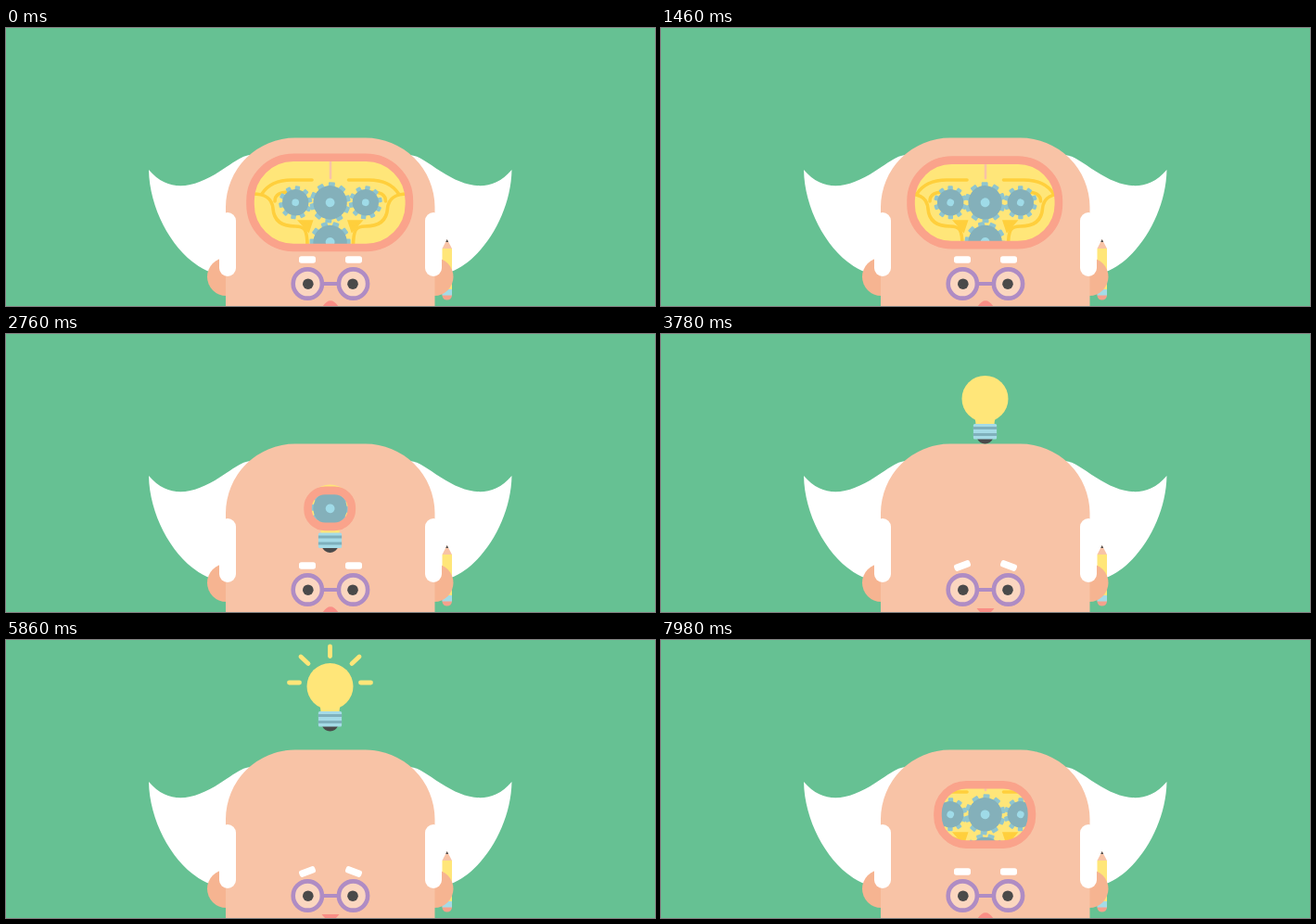
An HTML page that plays this animation: 700x300 px, repeating every 8 s.

```html
<!DOCTYPE html>
<html lang="en">
<head>
<meta charset="utf-8">
<title>Bright idea</title>
<style>
html, body { margin: 0; width: 100%; height: 100%; overflow: hidden; background: #66c193; }
svg { display: block; width: 100vw; height: 100vh; }
</style>
</head>
<body>
<svg viewBox="0 0 700 300">
  <defs>
    <clipPath id="opening"><rect class="window"/></clipPath>
    <g id="hair">
      <path fill="#fff" d="M154 153C177 180 205 171 230 155C246 145 253 138 264 137L272 220L240 267C197 268 155 209 154 153Z"/>
    </g>
    <g id="folds" fill="none" stroke="#ffcf3c" stroke-width="3.6" stroke-linecap="round">
      <path d="M330 164H308C294 164 283 168 276 179"/>
      <path d="M266 179C279 179 287 183 288 195C289 208 298 214 312 214C322 214 325 217 325 236"/>
      <path d="M318 209H329L326 218Z" fill="#ffcf3c"/>
      <path d="M290 187C290 180 296 177 304 177H318"/>
    </g>
  </defs>

  <use href="#hair"/>
  <use href="#hair" transform="matrix(-1 0 0 1 699.5 0)"/>

  <path fill="#ffe679" d="M470.5 238H481V284H470.5Z"/>
  <path fill="#f8c3a6" d="M470.5 238L475.7 228L481 238Z"/>
  <path fill="#4a4a4a" d="M474.3 231L475.7 228L477.2 231Z"/>
  <path fill="#f6a18c" d="M470.5 287H481V289Q480 293.5 475.7 293.5T470.5 289Z"/>
  <path fill="#a5dbe6" d="M470.5 282H481V288.5H470.5Z"/>

  <circle cx="237.5" cy="268.5" r="20.5" fill="#f6b491"/>
  <circle cx="462" cy="268.5" r="20.5" fill="#f6b491"/>
  <path fill="#f8c3a6" d="M237 300V193A75 75 0 0 1 312 118.500H387.500A75 75 0 0 1 462.500 193V300Z"/>
  <rect x="230" y="199" width="18" height="69" rx="9" fill="#fff"/>
  <rect x="452" y="199" width="18" height="69" rx="9" fill="#fff"/>

  <g fill="#fff">
    <rect id="browL" x="316" y="246.300" width="18" height="7.400" rx="2.600"/>
    <rect id="browR" x="366" y="246.300" width="18" height="7.400" rx="2.600"/>
  </g>
  <g fill="#fbd6c0" stroke="#af8cc4" stroke-width="4.6">
    <path d="M342 276H358" stroke-width="4"/>
    <circle cx="325.3" cy="276" r="15.600"/>
    <circle cx="374.500" cy="276" r="15.600"/>
  </g>
  <circle cx="325.800" cy="276.200" r="5.800" fill="#4a4a4a"/>
  <circle cx="374" cy="276.200" r="5.800" fill="#4a4a4a"/>
  <path id="mouth" fill="#fa8e86"/>

  <g id="bulb">
    <path fill="#4a4a4a" d="M-9 42H9Q6 48.500 0 48.500T-9 42Z"/>
    <circle r="25" fill="#ffe679"/>
    <path fill="#ffe679" d="M-13 18H13Q10 22 10 28H-10Q-10 22 -13 18Z"/>
    <rect x="-12.600" y="27" width="25.200" height="16.500" rx="1.500" fill="#a5dbe6"/>
    <path stroke="#7fb0bc" stroke-width="3" d="M-12.600 31.500H12.600M-12.600 38.500H12.600"/>
    <g id="rays" fill="none" stroke="#ffe679" stroke-width="4.800" stroke-linecap="round">
      <path d="M33 -4H44"/>
      <path d="M23.500 -24.500L31.500 -32"/>
      <path d="M0 -32.500V-43"/>
      <path d="M-23.500 -24.500L-31.500 -32"/>
      <path d="M-33 -4H-44"/>
    </g>
  </g>

  <g clip-path="url(#opening)">
    <path fill="#ffe679" d="M250 130H450V250H250Z"/>
    <use href="#folds"/>
    <use href="#folds" transform="matrix(-1 0 0 1 699.5 0)"/>
    <path stroke="#f8c3a6" stroke-width="2.600" stroke-linecap="round" d="M350 136V162"/>
    <g id="gears"></g>
  </g>
  <rect class="window" id="ring" fill="none" stroke="#faa38b"/>
</svg>
<script>
const LOOP = 8000;
const $ = id => document.getElementById(id);
const clamp = x => Math.min(1, Math.max(0, x));
const smooth = (a, b, t) => { const u = clamp((t - a) / (b - a)); return u * u * (3 - 2 * u); };
const mix = (a, b, u) => a + (b - a) * u;

// Smooth curve through [time, value] points, flat at turning points and ends.
function track(points, t) {
  const last = points.length - 1;
  if (t <= points[0][0]) return points[0][1];
  if (t >= points[last][0]) return points[last][1];
  const i = points.findIndex(p => p[0] > t) - 1;
  const rate = k => (points[k + 1][1] - points[k][1]) / (points[k + 1][0] - points[k][0]);
  const slope = k => {
    if (k === 0 || k === last) return 0;
    const a = rate(k - 1), b = rate(k);
    return a * b <= 0 ? 0 : 2 * a * b / (a + b);
  };
  const [t0, v0] = points[i], [t1, v1] = points[i + 1];
  const d = t1 - t0, u = (t - t0) / d, w = 1 - u;
  return v0 * w * w * (1 + 2 * u) + v1 * u * u * (3 - 2 * u)
    + d * u * w * (slope(i) * w - slope(i + 1) * u);
}

const windowWidth = [[1000, 180], [1300, 175], [1460, 168], [1660, 153], [2480, 82],
  [2760, 56], [3150, 0], [6780, 0], [7260, 50], [7980, 110], [8000, 111.5]];
const bulbHeight = [[2700, 188], [2760, 187.6], [2900, 178], [3280, 132], [3780, 70],
  [4100, 38], [4220, 34], [4620, 52], [5680, 52], [5860, 50], [6200, 28], [6500, -8], [6870, -55]];
const rayStarts = [4500, 4830, 5025, 5220, 5415];

// x, y, body radius, teeth, degrees per second, starting angle
const gears = [
  [312.2, 188.3, 14.2, 10, -55, 8],
  [387.8, 188.3, 14.2, 10, -55, 8],
  [349.6, 231, 18.2, 10, -45, 18],
  [349.6, 188.3, 18.2, 10, 45, 5]
].map(([x, y, r, teeth, speed, angle]) => {
  const size = r * 0.38;
  const tooth = `<rect x="${-size / 2}" y="${-r - 3.8}" width="${size}" height="8" rx="1"`;
  let shape = '';
  for (let k = 0; k < teeth; k++) shape += `${tooth} transform="rotate(${k * 360 / teeth})"/>`;
  $('gears').insertAdjacentHTML('beforeend',
    `<g><g fill="#8fc5cf">${shape}</g><circle r="${r}" fill="#84b0ba"/><circle r="${r * 0.27}" fill="#9fdbe8"/></g>`);
  const node = $('gears').lastElementChild;
  return t => node.setAttribute('transform',
    `translate(${x} ${y}) rotate(${angle + speed * t / 1000})`);
});

const windows = document.querySelectorAll('.window');
const rays = [...$('rays').children];
rays.forEach(ray => ray.setAttribute('pathLength', 1));

function drawWindow(t) {
  const outer = track(windowWidth, t);
  const stroke = Math.min(8.6, outer * 0.4);
  const w = outer - stroke;
  const h = Math.min(w, 16.8 + 0.469 * w);
  const box = { x: 349.2 - w / 2, y: 188.4 - h / 2, width: w, height: h, rx: h * 0.48 };
  for (const node of windows)
    for (const key in box) node.setAttribute(key, box[key]);
  $('ring').setAttribute('stroke-width', stroke);
  $('ring').style.display = outer > 0.1 ? '' : 'none';
}

function drawFace(t) {
  const joy = smooth(3120, 3600, t) - smooth(6700, 7120, t);
  $('browL').setAttribute('transform', `rotate(${-20 * joy} 325 250)`);
  $('browR').setAttribute('transform', `rotate(${20 * joy} 375 250)`);
  const side = mix(302, 296, joy), top = mix(286.5, 296, joy), low = mix(314, 309, joy);
  $('mouth').setAttribute('d', `M340.5 ${side}Q350 ${top} 359.5 ${side}Q350 ${low} 340.5 ${side}Z`);
}

function drawBulb(t) {
  $('bulb').setAttribute('transform', `translate(349.5 ${track(bulbHeight, t)})`);
  rays.forEach((ray, i) => {
    const grown = smooth(rayStarts[i], rayStarts[i] + 205, t);
    ray.style.display = grown > 0 ? '' : 'none';
    ray.setAttribute('stroke-dasharray', `${grown} 2`);
  });
}

function frame() {
  const t = performance.now() % LOOP;
  gears.forEach(turn => turn(t));
  drawWindow(t);
  drawFace(t);
  drawBulb(t);
  requestAnimationFrame(frame);
}
frame();
</script>
</body>
</html>
```
